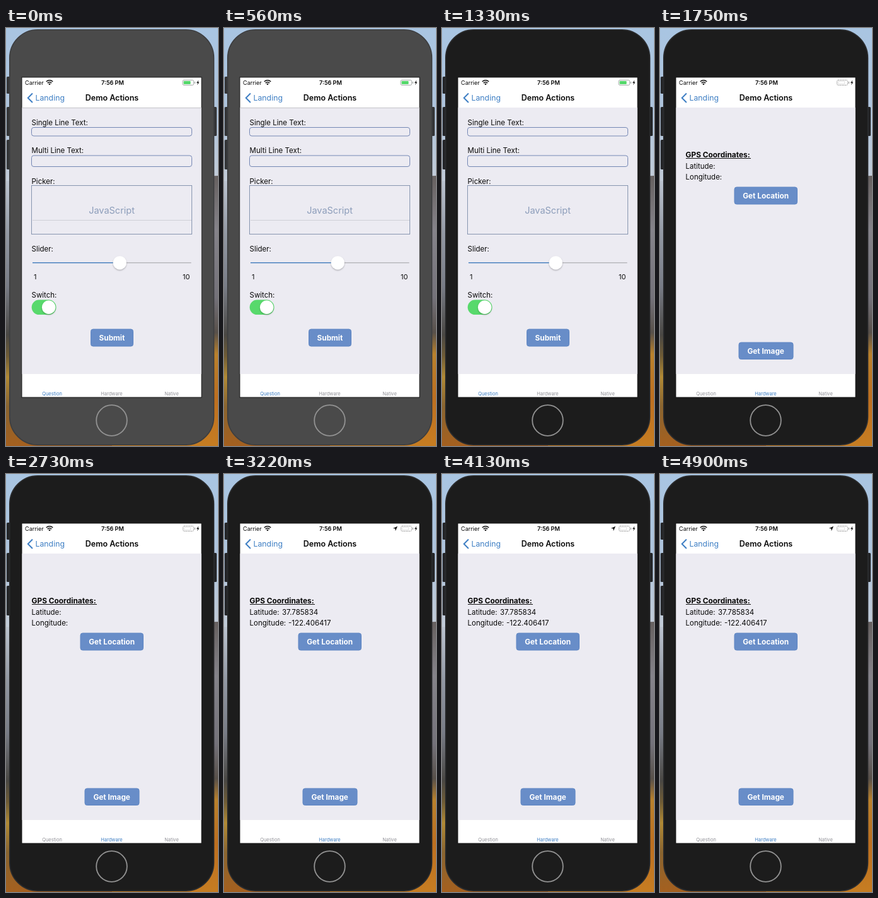
Recreate the animation shown at these times as an HTML page. Size 336 by 662 pixels, loop 4.97 s.

```html
<!DOCTYPE html>
<html lang="en">
<head>
<meta charset="utf-8">
<title>Demo Actions</title>
<style>
  html, body { margin: 0; width: 100%; height: 100%; overflow: hidden; background: #1c1c1c; }
  svg { display: block; width: 336px; height: 662px; }
  text { font-family: Inter, "Liberation Sans", sans-serif; font-size: 11.5px; fill: #080808; }
  .mid { text-anchor: middle; }
  .nav { font-size: 12.5px; font-weight: 600; }
  .back { font-size: 12.3px; fill: #3f7fc4; }
  .status { font-size: 9.1px; }
  .bold { font-weight: 700; font-size: 11.9px; }
  .btn text { font-weight: 700; font-size: 11.8px; fill: #fff; }
  .btn rect { fill: #688dc8; stroke: #5f86c3; }
  .tabs text { font-size: 7.5px; fill: #929298; }
  .tabs .on { fill: #3f7fc4; }
  .field { fill: none; stroke: #7487b4; }

  .shell, .key, .idle, .question, .hardware, .found {
    animation: 4970ms step-end infinite;
  }
  .shell { fill: #4a4a4a; stroke: #3d3e40; animation-name: wake; }
  .key { fill: #343537; animation-name: wakeKey; }
  .idle { animation-name: idle; }
  .question { animation-name: question; }
  .hardware { animation-name: hardware; }
  .found { animation-name: found; }
  @keyframes wake {
    0% { fill: #4a4a4a; stroke: #3d3e40 }
    26.75%, 100% { fill: #1c1c1c; stroke: #2b2c2e }
  }
  @keyframes wakeKey { 0% { fill: #343537 } 26.75%, 100% { fill: #242528 } }
  @keyframes idle { 0% { visibility: visible } 26.75%, 100% { visibility: hidden } }
  @keyframes question { 0% { visibility: visible } 32.38%, 100% { visibility: hidden } }
  @keyframes hardware { 0% { visibility: hidden } 32.38%, 100% { visibility: visible } }
  @keyframes found { 0% { visibility: hidden } 61.96%, 100% { visibility: visible } }
</style>
</head>
<body>
<svg viewBox="0 0 336 662">
  <defs>
    <linearGradient id="sky" x2="0" y2="1">
      <stop offset="0" stop-color="#a9c5e2"/>
      <stop offset=".2" stop-color="#afc4dc"/>
      <stop offset=".37" stop-color="#c3ccd8"/>
    </linearGradient>
    <linearGradient id="west" x2="0" y2="1">
      <stop offset="0" stop-color="#bcc4d0"/>
      <stop offset=".2" stop-color="#9399a4"/>
      <stop offset=".4" stop-color="#787c86"/>
      <stop offset=".58" stop-color="#4a4844"/>
      <stop offset=".66" stop-color="#6f5c36"/>
      <stop offset=".74" stop-color="#b18a35"/>
      <stop offset=".85" stop-color="#8a6530"/>
      <stop offset="1" stop-color="#a5601f"/>
    </linearGradient>
    <linearGradient id="east" x2="0" y2="1">
      <stop offset="0" stop-color="#66605f"/>
      <stop offset=".2" stop-color="#85838a"/>
      <stop offset=".45" stop-color="#74727a"/>
      <stop offset=".58" stop-color="#58504a"/>
      <stop offset=".66" stop-color="#b9812c"/>
      <stop offset=".82" stop-color="#bd6f20"/>
      <stop offset="1" stop-color="#c67d22"/>
    </linearGradient>
    <filter id="soft" x="-50%" y="-50%" width="200%" height="200%">
      <feDropShadow dx="0" dy="1.3" stdDeviation="1.2" flood-opacity=".3"/>
    </filter>
  </defs>

  <!-- desktop -->
  <rect width="336" height="662" fill="url(#sky)"/>
  <path d="M0 242H168V662H0Z" fill="url(#west)"/>
  <path d="M168 240L336 234V662H168Z" fill="url(#east)"/>

  <!-- phone -->
  <g class="key">
    <rect x="1" y="77" width="8" height="27" rx="1.5"/>
    <rect x="1" y="125" width="8" height="46" rx="1.5"/>
    <rect x="1" y="177" width="8" height="47" rx="1.5"/>
    <rect x="326" y="125" width="8" height="46" rx="1.5"/>
  </g>
  <rect class="shell" x="5.8" y="2.8" width="323.6" height="657.4" rx="44.5" stroke-width="1.6"/>
  <circle cx="167.5" cy="621.5" r="24.3" fill="none" stroke="#929292" stroke-width="1.8"/>

  <!-- screen -->
  <rect x="25" y="78" width="285" height="507" fill="#fff" stroke="#161616"/>
  <rect x="25.5" y="126" width="284" height="422" fill="#ecebf2"/>
  <path class="idle" d="M25.5 126.5H309.5" stroke="#c4c4c8"/>

  <!-- status bar -->
  <text class="status" x="30" y="89.7">Carrier</text>
  <g fill="none" stroke="#111" stroke-width="1.5">
    <path d="M63.8 85A7.3 7.3 0 0 1 74.2 85"/>
    <path d="M65.8 87.1A4.5 4.5 0 0 1 72.2 87.1"/>
  </g>
  <path d="M69 90.5L67.2 88.5A2.6 2.6 0 0 1 70.8 88.5Z" fill="#111"/>
  <text class="status mid" x="169" y="89.7" font-weight="600">7:56 PM</text>
  <g class="question">
    <rect x="280" y="82.5" width="17.5" height="8" rx="2" fill="#fff" stroke="#8f9692" stroke-width=".8"/>
    <rect x="281.5" y="84" width="11" height="5" rx=".8" fill="#53d769"/>
    <path d="M299.3 85V88" stroke="#8f9692"/>
  </g>
  <g class="hardware" fill="none" stroke="#8c8c8c">
    <rect x="280.5" y="82.5" width="17" height="8" rx="2" stroke-dasharray="1.6 1"/>
    <path d="M282.5 84.5H292.5V88.5H282.5Z" stroke="#c4c4c4" stroke-dasharray="1 1"/>
    <path d="M299.3 85V88"/>
  </g>
  <path d="M305.2 82.4L302 87H304L303 90.6L306.3 85.8H304.4Z" fill="#111"/>

  <!-- navigation -->
  <path d="M42 103.5L34.8 110.7L42 118" fill="none" stroke="#3f7fc4" stroke-width="2"/>
  <text class="back" x="46.5" y="115">Landing</text>
  <text class="nav mid" x="168" y="115">Demo Actions</text>

  <g class="question">
    <text x="40.5" y="153.8">Single Line Text:</text>
    <rect class="field" x="40.5" y="157.5" width="254" height="13.5" rx="3.5"/>
    <text x="40.5" y="198.3">Multi Line Text:</text>
    <rect class="field" x="40.5" y="202" width="254" height="17.5" rx="3.5"/>
    <text x="40.5" y="246.5">Picker:</text>
    <rect x="40.5" y="249.5" width="254" height="77" fill="none" stroke="#8795b0"/>
    <path class="idle" d="M42 304.5H294" stroke="#cfcfd6"/>
    <text class="mid" x="167.5" y="294" style="font-size:14.5px;fill:#8c9dba">JavaScript</text>

    <text x="40.5" y="354">Slider:</text>
    <path d="M180 371.8H293.5" stroke="#b8b8bd" stroke-width="1.5"/>
    <path d="M42 371.8H180" stroke="#4b82bf" stroke-width="1.5"/>
    <circle cx="180.3" cy="371.8" r="10.6" fill="#fff" filter="url(#soft)"/>
    <text x="44" y="397.7" style="font-size:11px">1</text>
    <text x="291.5" y="397.7" text-anchor="end" style="font-size:11px">10</text>

    <text x="40.5" y="427">Switch:</text>
    <rect x="40.7" y="430.5" width="38.8" height="23.6" rx="11.8" fill="#58d96c"/>
    <circle cx="67.7" cy="442.3" r="10.7" fill="#fff" filter="url(#soft)"/>
    <g class="btn">
      <rect x="134.5" y="477" width="67" height="27" rx="3.5"/>
      <text class="mid" x="168" y="494.8">Submit</text>
    </g>
    <g class="tabs mid">
      <text class="on" x="73" y="582">Question</text>
      <text x="167.5" y="582">Hardware</text>
      <text x="262.5" y="582">Native</text>
    </g>
  </g>

  <g class="hardware">
    <text class="bold" x="40.5" y="204.8">GPS Coordinates:</text>
    <path d="M41 206.5H144" stroke="#111"/>
    <text x="40.5" y="223.3">Latitude:</text>
    <text x="40.5" y="240">Longitude:</text>
    <g class="btn">
      <rect x="118" y="252" width="99.5" height="27" rx="3.5"/>
      <text class="mid" x="167.7" y="269.9">Get Location</text>
      <rect x="125" y="498" width="86" height="26.5" rx="3.5"/>
      <text class="mid" x="167.7" y="515.6">Get Image</text>
    </g>
    <g class="tabs mid">
      <text x="73" y="582">Question</text>
      <text class="on" x="167.5" y="582">Hardware</text>
      <text x="262.5" y="582">Native</text>
    </g>
  </g>

  <g class="found">
    <path d="M275 82.8L271.8 90.2L271.2 86.6L267.8 86Z" fill="#111"/>
    <text x="92" y="223.3">37.785834</text>
    <text x="102" y="240">-122.406417</text>
  </g>
</svg>
</body>
</html>
```
